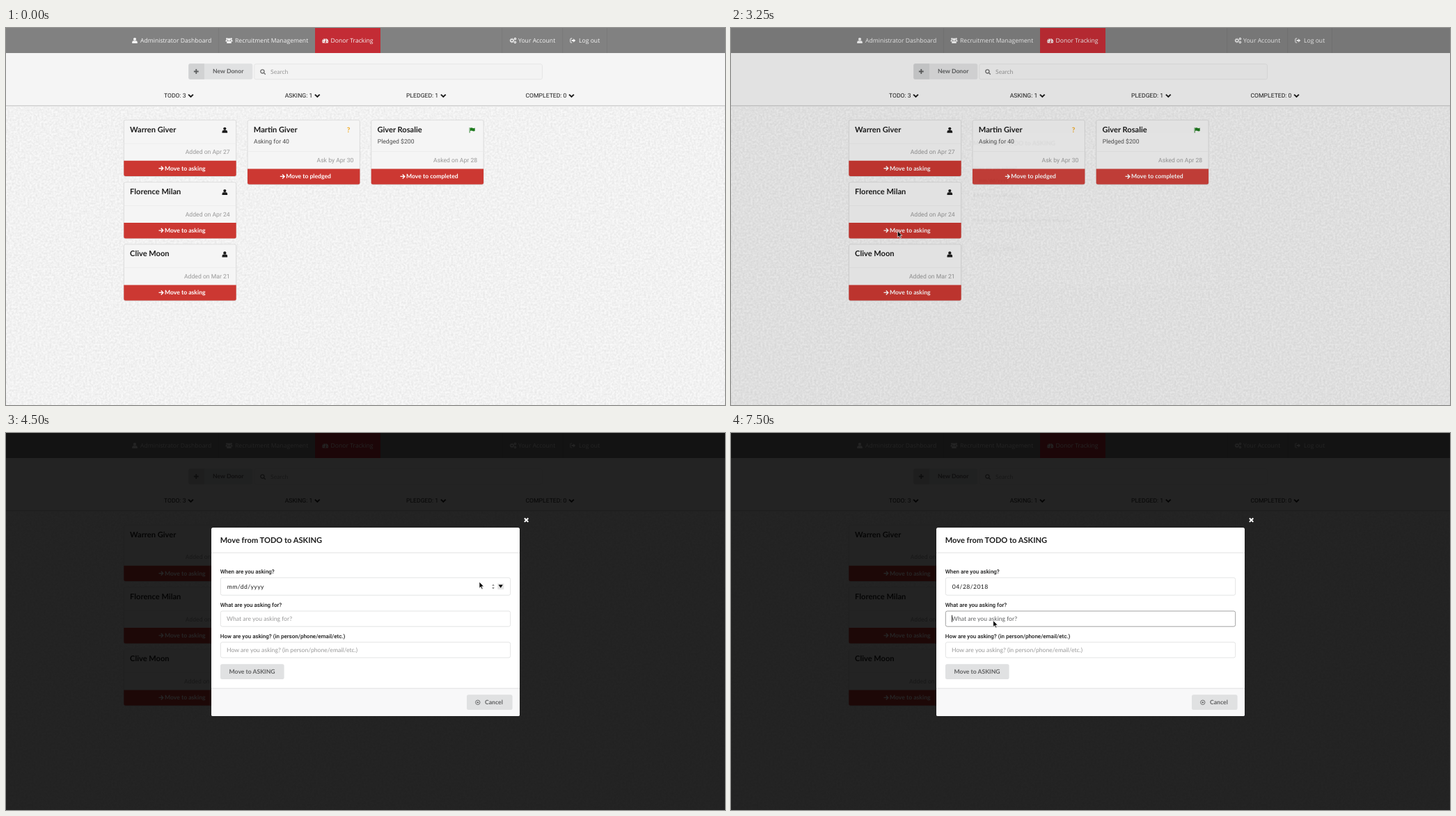
Animation, 1033 px wide and 542 px high, one loop 8000 ms. Source, as an HTML page:

```html
<!DOCTYPE html>
<html lang="en">
<head>
<meta charset="utf-8">
<title>Donor Tracking</title>
<style>
  html, body { margin: 0; width: 100%; height: 100%; overflow: hidden; background: #f2f2f2; }
  svg { display: block; width: 100vw; height: 100vh; }
  text { font: 8.63px Lato, sans-serif; fill: #1c1c1c; text-rendering: geometricPrecision; white-space: pre; }
  .nav { font-family: "Open Sans", sans-serif; fill: #f4f4f4; }
  .rob { font-family: Roboto, sans-serif; }
  .label { font: 500 8px Roboto, sans-serif; }
  .bold { font-weight: 700; }
  .head { font-size: 11.1px; font-weight: 700; }
  .soft { fill: #5f6061; }
  .grey { fill: #989898; }
  .desc { fill: #4c4c4c; }
  .white { fill: #fff; }
  .end { text-anchor: end; }
  .mid { text-anchor: middle; }
  .date { letter-spacing: .4px; }
  .cal { font: 500 7.4px Inter, sans-serif; }
  .out { fill: #aaa; font-weight: 400; }
  .field { fill: #fff; stroke: #dcdddd; stroke-width: .8; }
  .focus { stroke: #8c8c8c; }
  .line { fill: none; stroke: currentColor; }
</style>
</head>
<body>
<svg id="stage" viewBox="0 0 1033 542" preserveAspectRatio="none" xmlns="http://www.w3.org/2000/svg">
  <defs>
    <filter id="paper" x="0" y="0" width="100%" height="100%">
      <feTurbulence type="fractalNoise" baseFrequency=".35" numOctaves="2" seed="4"/>
      <feColorMatrix values="0 0 0 0 0  0 0 0 0 0  0 0 0 0 0  .12 0 0 0 -.03"/>
    </filter>
    <clipPath id="modalClip"><rect x="301" y="138" width="431" height="264" rx="2.5"/></clipPath>
    <g id="user"><circle cy="-2" r="2.1"/><path d="M-3.8 4V2.4Q-3.8 .2-1.8 .2H1.8Q3.8 .2 3.8 2.4V4Z"/></g>
    <g id="users">
      <circle cx="-3" cy="-2.4" r="1.4"/><circle cx="3" cy="-2.4" r="1.4"/><circle cy="-1.4" r="2"/>
      <path d="M-5 1.6V0Q-5-.8-4-.8H-2L-3 1.6ZM5 1.6V0Q5-.8 4-.8H2L3 1.6ZM-3.3 4V2.4Q-3.3 .8-1.6 .8H1.6Q3.3 .8 3.3 2.4V4Z"/>
    </g>
    <path id="gauge" fill-rule="evenodd" d="M-4 3.5A4.5 4.5 0 1 1 4 3.5ZM-.9 2A1 1 0 1 0 .9 1.4L1.4-1.8L.7-2L0 .8ZM-3.4 .8H-2.3V1.8H-3.4ZM2.3 .8H3.4V1.8H2.3ZM-2.6-1.8H-1.6V-.8H-2.6ZM-.6-2.9H.4V-1.9H-.6Z"/>
    <g id="cogs" class="line">
      <circle cx="-1.4" r="1.9" stroke-width="1.3"/><circle cx="-1.4" r="2.9" stroke-width="1" stroke-dasharray="1.1 1.18"/>
      <circle cx="3.2" cy="-2.4" r="1.2" stroke-width="1.1"/><circle cx="3.2" cy="2.4" r="1.2" stroke-width="1.1"/>
    </g>
    <g id="exit"><path class="line" d="M-1.2-3H-2.6Q-3.7-3-3.7-1.9V1.9Q-3.7 3-2.6 3H-1.2"/><path d="M-1.8-1H.6V-2.8L3.8 0L.6 2.8V1H-1.8Z"/></g>
    <path id="plus" class="line" stroke-width="1.8" d="M-3.4 0H3.4M0-3.4V3.4"/>
    <g id="lens" class="line" stroke-width="1.3"><circle cx="-.6" cy="-.6" r="2.6"/><path d="M1.3 1.3L3.8 3.8"/></g>
    <path id="chevron" class="line" stroke-width="2" d="M-3.4-1.6L0 1.7L3.4-1.6"/>
    <path id="arrow" class="line" stroke-width="1.4" d="M-3.3 0H2.8M0-3L3 0L0 3"/>
    <path id="flag" d="M-4-3.6H-3.1V4H-4ZM-2.7-3Q-1-4 .6-3.1T4-3.2V1.2Q2.3 2.1 .6 1.2T-2.7 1.3Z"/>
    <path id="cross" class="line" stroke-width="2" d="M-2.7-2.7L2.7 2.7M2.7-2.7L-2.7 2.7"/>
    <g id="stop"><circle class="line" r="3.2" stroke-width=".9"/><path class="line" stroke-width="1" d="M-1.5 0H1.5M0-1.2V1.2"/></g>
  </defs>
  <g id="page"></g>
  <g id="fronts"></g>
  <rect id="dimmer" width="1033" height="542"/>
  <g id="modal"></g>
  <use id="ghost" href="#fronts" clip-path="url(#modalClip)" opacity=".25"/>
  <path id="cursor" d="M0 0V9.2L2.1 7.3L3.6 10.6L5.1 9.9L3.6 6.7H6.5Z" stroke="#fff" stroke-width=".7"/>
</svg>
<script>
const LOOP = 8000;
const $ = id => document.getElementById(id);
const text = (x, y, s, cls = '', attrs = '') => `<text x="${x}" y="${y}" class="${cls}" ${attrs}>${s}</text>`;
const rect = (x, y, w, h, attrs = '') => `<rect x="${x}" y="${y}" width="${w}" height="${h}" ${attrs}/>`;
const icon = (name, x, y, color) => `<use href="#${name}" x="${x}" y="${y}" fill="${color}" color="${color}"/>`;
const group = (id, body) => `<g id="${id}">${body}</g>`;

// Cards: x, y, name, icon, description, date, action, action text offset
const cards = [
  [169.3, 132.3, 'Warren Giver', 'user', '', 'Added on Apr 27', 'asking', 58.7],
  [169.3, 221.6, 'Florence Milan', 'user', '', 'Added on Apr 24', 'asking', 58.7],
  [169.3, 310.9, 'Clive Moon', 'user', '', 'Added on Mar 21', 'asking', 58.7],
  [347, 132.3, 'Martin Giver', '?', 'Asking for 40', 'Ask by Apr 30', 'pledged', 55.3],
  [524.7, 132.3, 'Giver Rosalie', 'flag', 'Pledged $200', 'Asked on Apr 28', 'completed', 50.3]
];
const cardHeight = c => c[4] ? 92.4 : 80.8;

function cardBack(c) {
  const [x, y] = c, h = cardHeight(c);
  return rect(x, y + .7, 161.4, h, 'rx="2.5" fill="#d0d0d0"') +
    rect(x, y, 161.4, h, 'rx="2.5" fill="#f5f5f5" stroke="#d4d4d5" stroke-width=".7"');
}

function cardFront(c, i) {
  const [x, y, name, mark, desc, date, action, tx] = c, h = cardHeight(c), b = y + h;
  const r = x + 161.4, top = b - 22.3;
  const badge = mark === '?'
    ? text(x + 145, y + 18, '?', 'bold', 'style="fill:#f2a91c;font-size:10px;text-anchor:middle"')
    : icon(mark, x + 145, y + 14.5, mark === 'flag' ? '#1e7a1e' : '#1c1c1c');
  return text(x + 8.8, y + 17.4, name, 'head') + badge +
    (desc ? text(x + 9, y + 33.4, desc, 'rob desc') : '') +
    rect(x + .4, top - 25, 160.6, .6, 'fill="#e8e8e8"') +
    text(r - 9, top - 9.4, date, 'rob grey end') +
    `<path id="act${i}" fill="#cc3832" d="M${x} ${top}H${r}V${b - 2.5}q0 2.5-2.5 2.5H${x + 2.5}q-2.5 0-2.5-2.5Z"/>` +
    icon('arrow', x + tx - 5.2, top + 11, '#fff') +
    text(x + tx, top + 14, 'Move to ' + action, 'bold white');
}

function buildPage() {
  const nav = [
    [193, 'Administrator Dashboard', 'user', 185], [329, 'Recruitment Management', 'users', 320.5],
    [466.5, 'Donor Tracking', 'gauge', 458.7], [736, 'Your Account', 'cogs', 728.3], [823, 'Log out', 'exit', 814.5]
  ].map(([x, s, ic, ix]) => icon(ic, ix, 18, '#f4f4f4') + text(x, 21, s, 'nav')).join('');
  const rules = [305, 712.5, 799.5, 863].map(x => rect(x, 0, .7, 36, 'fill="#777"')).join('');
  const columns = [
    [227, 'TODO: 3', 265.5], [400.7, 'ASKING: 1', 447.3], [575, 'PLEDGED: 1', 628.3], [746.5, 'COMPLETED: 0', 812.5]
  ].map(([x, s, cx]) => text(x, 100, s, 'rob') + icon('chevron', cx, 97.2, '#1c1c1c')).join('');
  const patch = (t, ...boxes) => `<g class="patch" data-t="${t}" fill="#fdfdfd">${boxes.map(b => rect(...b)).join('')}</g>`;

  $('page').innerHTML =
    rect(0, 0, 1033, 542, 'fill="#f9f9f9"') + rect(0, 112, 1033, 430, 'filter="url(#paper)"') +
    rect(0, 36, 1033, 76, 'fill="#f5f5f5"') + rect(0, 111, 1033, 1, 'fill="#d0d0d0"') +
    rect(0, 112, 1033, 1, 'fill="#e4e4e4"') +
    rect(0, 0, 1033, 36, 'fill="#818181"') + rules + rect(444, 0, 94, 36, 'fill="#c32c35"') + nav +
    rect(262.3, 51.3, 92, 22.5, 'rx="2.5" fill="#e0e1e2"') +
    `<path fill="#d1d2d3" d="M285 51.3H264.8q-2.5 0-2.5 2.5V71.3q0 2.5 2.5 2.5H285Z"/>` +
    icon('plus', 273.3, 62.5, '#5f6061') + text(297, 65.4, 'New Donor', 'bold soft') +
    rect(356.7, 51.8, 413.8, 22, 'rx="2.5" fill="#f3f3f3" stroke="#e2e2e2" stroke-width=".8"') +
    icon('lens', 369, 63, '#6c6c6c') + text(380, 65.9, 'Search', 'grey') +
    columns + cards.map(cardBack).join('') +
    patch(1500, [285, 91, 56, 20], [285, 133, 45, 30]) +
    patch(1750, [251, 150, 44, 15], [251, 222, 44, 33]) +
    patch(2000, [246, 256, 15, 24]);
  $('fronts').innerHTML = cards.map(cardFront).join('');
}

function buildCalendar() {
  const col = i => 325.6 + 20.9 * i, row = i => 285.7 + 12.3 * i;
  let s = rect(308.3, 234.3, 160.4, 111.6, 'fill="#fff" stroke="#bdbdbd" stroke-width=".8"') +
    text(317.5, 250.7, 'April 2018', 'cal') + '<path d="M357 247h4.4l-2.2 2.8Z"/>';
  [413.6, 430.6, 447.6].forEach((x, i) => {
    const cx = x + 6.8;
    s += rect(x, 240.7, 13.6, 13.6, 'rx="1" fill="#ededed" stroke="#b4b4b4" stroke-width=".8"') +
      (i === 1 ? `<circle cx="${cx}" cy="247.5" r="1.7" fill="#444"/>`
               : `<path fill="#444" d="M${cx + i - 1} 245.7v3.6l${i ? 2 : -2}-1.8Z"/>`);
  });
  s += rect(315, 262, 147, 77, 'fill="#fff" stroke="#7fa6e4" stroke-width="1"') +
    rect(315.5, 262.5, 146, 14, 'fill="#f2f2f2"') + rect(315.5, 276.3, 146, .6, 'fill="#c8c8c8"') +
    rect(441, 314.2, 20.4, 12, 'id="hover" fill="#dfe8fa"') +
    rect(419.8, 314.2, 20.6, 12, 'fill="none" stroke="#b5b5b5" stroke-width=".7"');
  'Sun Mon Tue Wed Thu Fri Sat'.split(' ').forEach((d, i) => s += text(col(i), 272.2, d, 'cal mid'));
  for (let i = 0; i < 35; i++)
    s += text(col(i % 7), row(Math.floor(i / 7)), i % 30 + 1, 'cal mid' + (i > 29 ? ' out' : ''));
  return s;
}

function buildModal() {
  const field = (id, y, h) => rect(308.3, y, 416.4, h, `id="${id}" class="field" rx="2.5"`);
  const how = 'How are you asking? (in person/phone/email/etc.)', what = 'What are you asking for?';
  $('modal').innerHTML =
    rect(295, 136, 443, 271, 'rx="2.5" fill="#fff"') +
    `<path fill="#f8f8f9" d="M295 367H738V404.5q0 2.5-2.5 2.5H297.5q-2.5 0-2.5-2.5Z"/>` +
    rect(295, 171.7, 443, .8, 'fill="#dadada"') + rect(295, 366.7, 443, .8, 'fill="#dadada"') +
    icon('cross', 747.6, 125.2, '#fff') +
    text(307.8, 158, 'Move from TODO to ASKING', 'head') +
    text(307.8, 202, 'When are you asking?', 'label') + field('dateField', 208, 25.2) +
    rect(317.4, 215, 14.8, 11, 'id="mark" fill="#f0b9b9"') + text(317.8, 223.6, '', 'date', 'id="date"') +
    group('spin', rect(706.3, 216.3, 9, 8.5, 'fill="#e4e4e4"') +
      '<path fill="#777" d="M698.2 219.6h3.6l-1.8-2.2ZM698.2 222h3.6l-1.8 2.2Z"/><path d="M707.6 218.3h6.2l-3.1 4.4Z"/>') +
    `<path id="clear" class="line" stroke="#999" d="M689.6 218.2l4.6 4.6m0-4.6l-4.6 4.6"/>` +
    text(307.8, 250, what, 'label') + field('whatField', 256, 22.2) +
    text(317, 269.7, what, '', 'id="what"') + rect(317, 261.8, .8, 10, 'id="caret"') +
    text(307.8, 295, how, 'label') + field('howField', 300.8, 22.2) + text(317, 314.6, how, 'grey') +
    rect(308, 332.3, 91.6, 21.8, 'rx="2.5" fill="#e0e1e2"') + text(353.6, 346.2, 'Move to ASKING', 'bold soft mid') +
    rect(662, 376.3, 65.6, 21.8, 'rx="2.5" fill="#e0e1e2"') + icon('stop', 677.8, 387.3, '#5f6061') +
    text(688, 390.4, 'Cancel', 'bold soft') +
    group('calendar', buildCalendar());
}

// Pointer stops: time, x, y
const stops = [
  [1250, 333, 93], [1500, 287, 150], [1750, 251, 244], [2000, 247, 286], [2250, 247, 297], [2750, 240, 294],
  [3000, 239.3, 291.7], [3750, 273, 290], [4000, 331, 242], [4250, 518, 210], [4500, 680, 214], [4750, 704, 219],
  [5000, 707.3, 219], [5500, 520, 282], [5750, 447, 336], [6000, 445, 320], [6750, 438, 324], [7000, 384, 280],
  [7250, 376.7, 269.5]
];
// Modal opening: time, dimmer opacity, modal opacity, scale, centre y
const phases = [[0, 0, 0, 1, 271.5], [3250, .08, .05, .808, 260], [3500, .73, .82, .973, 270], [3750, .855, 1, 1, 271.5]];

const current = (list, t) => list.filter(s => s[0] <= t).pop();
const show = (el, on) => el.style.display = on ? '' : 'none';

function render(t) {
  const within = (a, b = LOOP) => t >= a && t < b;
  const stop = current(stops, t);
  show($('cursor'), stop);
  if (stop) $('cursor').setAttribute('transform', `translate(${stop[1]} ${stop[2]})`);

  const [, dim, alpha, scale, cy] = current(phases, t);
  $('dimmer').setAttribute('opacity', dim);
  $('modal').setAttribute('opacity', alpha);
  $('modal').setAttribute('transform', `translate(516.5 ${cy}) scale(${scale}) translate(-516.5 -271.5)`);
  show($('modal'), alpha);
  show($('ghost'), within(3500, 3750));
  document.querySelectorAll('.patch').forEach(p => show(p, within(+p.dataset.t, 3250)));
  $('act1').setAttribute('fill', within(3000, 3250) ? '#ae2c26' : within(2750, 3000) ? '#ba312b' : '#cc3832');

  $('date').textContent = t < 6500 ? 'mm/dd/yyyy' : '04/28/2018';
  $('dateField').classList.toggle('focus', within(5000, 7500));
  $('whatField').classList.toggle('focus', within(7500));
  $('what').setAttribute('class', within(7500) ? 'soft' : 'grey');
  $('mark').setAttribute('width', t < 6500 ? 14.8 : 10.8);
  show($('mark'), within(5000, 7500));
  show($('spin'), within(4250, 5500));
  show($('clear'), within(6500, 7500));
  show($('caret'), within(7500));
  show($('calendar'), within(5250, 6500));
  show($('hover'), within(5750, 6500));
  $('hover').setAttribute('y', t < 6000 ? 326.4 : 314.2);
}

buildPage();
buildModal();
let last = -1;
function tick() {
  const t = Math.floor(performance.now() % LOOP / 250) * 250;
  if (t !== last) render(last = t);
  requestAnimationFrame(tick);
}
tick();
</script>
</body>
</html>
```
